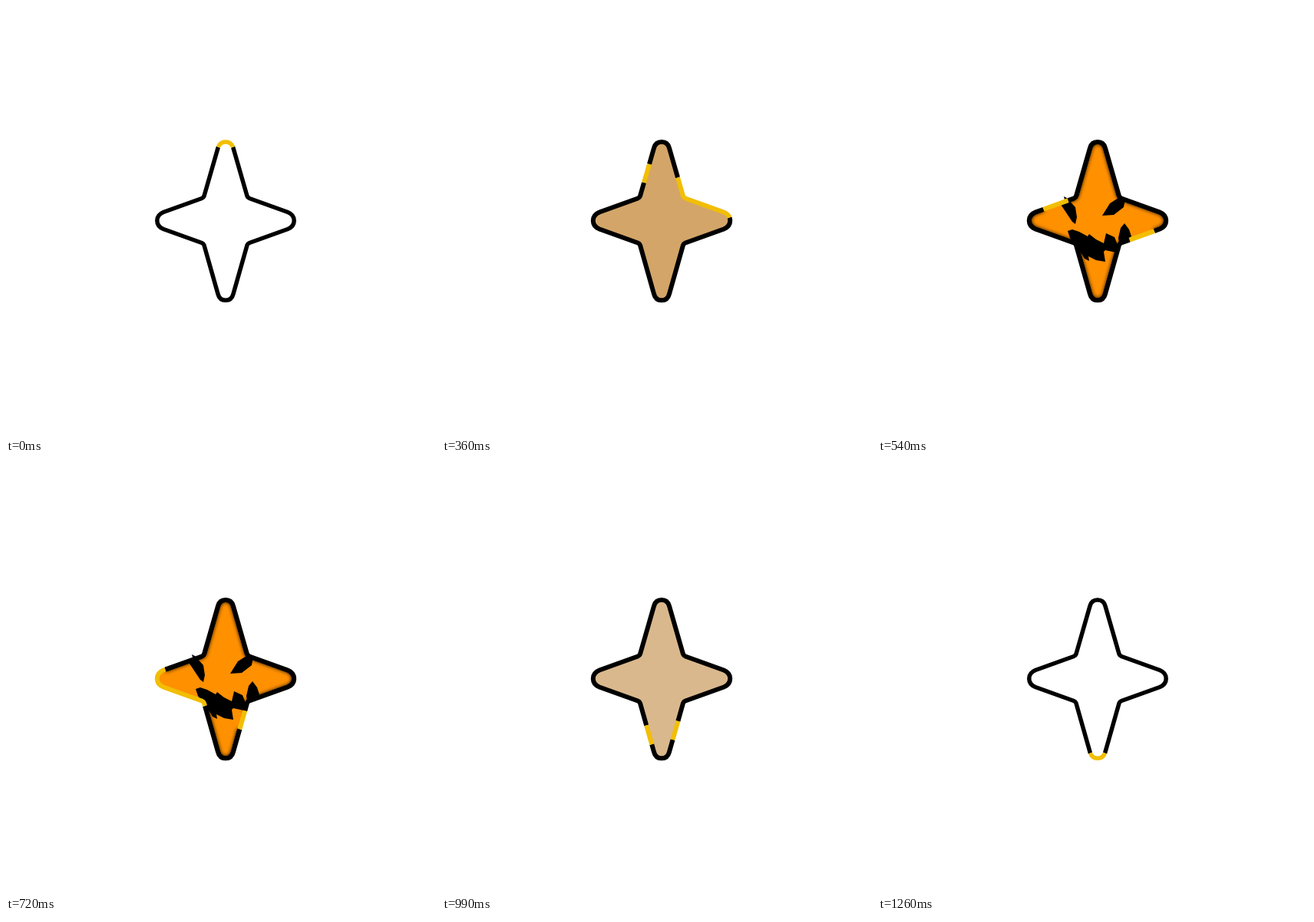
These frames come from a looping animation (560 by 560 pixels, 1350 ms). An HTML page with a canvas:

```html
<!DOCTYPE html>
<html>
<head>
<meta charset="utf-8">
<style>
html, body { margin: 0; height: 100%; overflow: hidden; background: #fff; }
canvas { display: block; }
</style>
</head>
<body>
<canvas width="560" height="560"></canvas>
<script>
const ctx = document.querySelector('canvas').getContext('2d');
const STEP = 90, STEPS = 15, LENGTH = 303;
const { PI, sin, exp, max, floor } = Math;

// Right half of the star, top tip to bottom tip, around its centre
const half = new Path2D(`M0 -103C5.5 -103 8.8 -99.5 10 -95L28 -32.5Q28.8 -30.3 31 -29.5
  L81 -11.5C87 -9 89.2 -5 89.2 -.5C89.2 4.5 87 8 81 10.5L31 28.5Q28.8 29.3 28 31.5
  L10 95C8.8 99.8 5.5 103.3 0 103.3`);
const star = new Path2D(half);
star.addPath(half, new DOMMatrix([-1, 0, 0, 1, 0, 0]));

const leftEye = 'M242 248L246 250L257 262L259 275L257 284L253 281L243 266L237 257L244 256Z';
const rightEye = 'M292 273L302 257L313 250L317 247L322 251L320 262L307 272Z';
const mouth = `M247 293L253 291L262 294L273 300L275 297L284 304L294 309L297 296L308 301L312 311
  L310 321L296 318L294 320L296 333L284 331L274 326L275 332L269 329L262 318L256 311L250 302Z`;
const tooth = 'M313 302L316 289L321 283L327 291L330 300L322 307L314 308Z';
const face = new Path2D(leftEye + rightEye + mouth + tooth);

// Each spark runs down one side; the waves bend its pace, and it is longest at its peak step
const sparks = [
  { side: -1, peak: 8, waves: [-.025, -.11] },
  { side: 1, peak: 4, waves: [.16, -.046, -.081] }
];

function span({ peak, waves }, step) {
  const u = step / (STEPS - 1);
  const pace = waves.reduce((sum, w, i) => sum + w * sin((i + 1) * PI * u), u);
  const reach = 12.5 + 34 * exp(-((step - peak) ** 2) / 2);
  return [max(0, pace * LENGTH - reach), pace * LENGTH + reach];
}

function strokeHalf(side, dash) {
  ctx.save();
  ctx.scale(side, 1);
  ctx.setLineDash(dash);
  ctx.stroke(half);
  ctx.restore();
}

// The black line leaves a gap where a spark is
function outline(step) {
  for (const spark of sparks) {
    const [from, to] = span(spark, step);
    strokeHalf(spark.side, [from, to - from, 999, 0]);
  }
}

function draw(step) {
  const fade = max(6 - step, step - 8, 0) / 6;
  const lit = fade === 0;
  ctx.clearRect(0, 0, 560, 560);
  ctx.save();
  ctx.translate(286, 280);
  ctx.fillStyle = `hsl(34 ${lit ? 100 : 62 - 22 * fade}% ${50 + 50 * fade ** 1.3}%)`;
  ctx.fill(star);

  ctx.strokeStyle = '#000';
  ctx.lineWidth = fade === 1 ? 5.5 : 6;
  if (lit) {
    ctx.save();
    ctx.clip(star);
    ctx.shadowColor = '#000';
    ctx.shadowBlur = 5;
    outline(step);
    ctx.restore();
  }
  outline(step);

  if (lit) {
    ctx.fillStyle = '#000';
    ctx.translate(-286, -280);
    ctx.fill(face);
    ctx.translate(286, 280);
  }
  ctx.strokeStyle = '#f2be05';
  for (const spark of sparks) {
    const [from, to] = span(spark, step);
    strokeHalf(spark.side, [0, from, to - from, 999]);
  }
  ctx.restore();
}

function frame() {
  draw(floor(performance.now() / STEP) % STEPS);
  requestAnimationFrame(frame);
}
frame();
</script>
</body>
</html>
```
